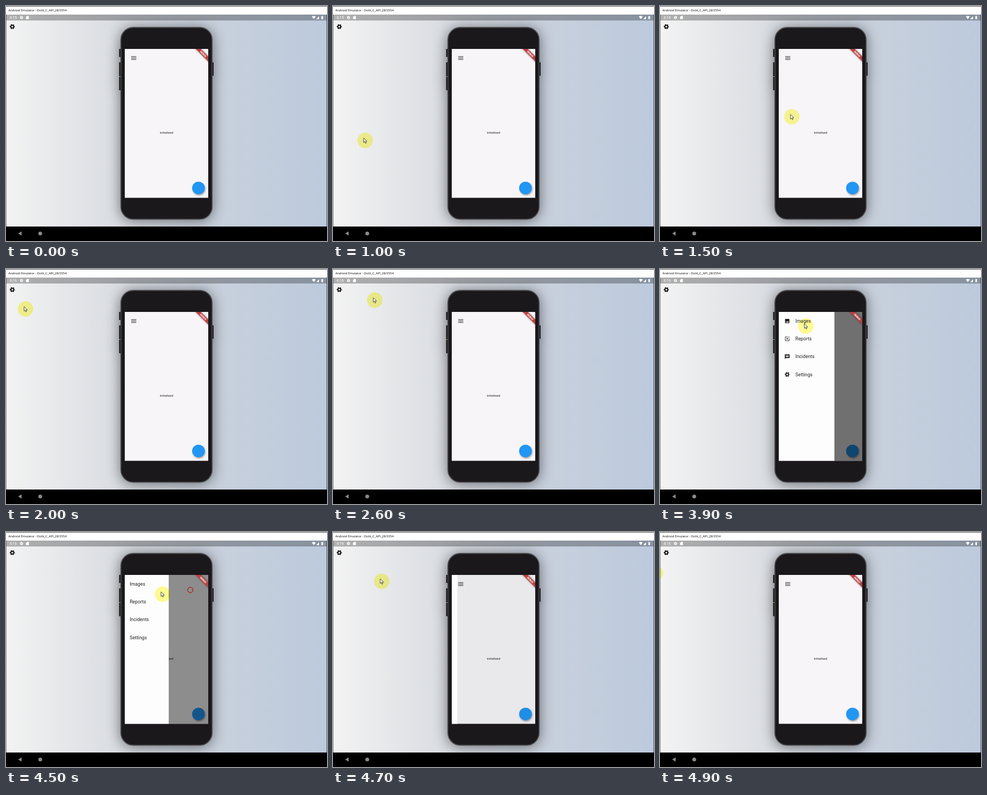
Write an HTML page that moves like this. It is 600 px wide and 438 px high and loops after 5 s.

```html
<!DOCTYPE html>
<html lang="en">
<head>
<meta charset="utf-8">
<title>Drawer demo</title>
<style>
  html, body { margin: 0; width: 100%; height: 100%; overflow: hidden; background: #000; }
  svg { display: block; }
  text { font-family: Roboto, sans-serif; }
  .title { font: 5.9px "Open Sans", sans-serif; }
  .item { font-size: 8.8px; fill: #222; }
  #phone { filter: drop-shadow(0 2px 12px rgba(0, 0, 0, .5)); }
  #fab { filter: drop-shadow(1.5px 2px 1.5px rgba(0, 0, 0, .35)); }
  #banner rect { filter: drop-shadow(0 0 1.5px rgba(0, 0, 0, .5)); }
  #halo { mix-blend-mode: multiply; }
</style>
</head>
<body>
<svg width="600" height="438" viewBox="0 0 600 438">
  <defs>
    <linearGradient id="sky">
      <stop offset="0" stop-color="#f3f3f3"/>
      <stop offset=".35" stop-color="#d9dce1"/>
      <stop offset=".65" stop-color="#c8d0dc"/>
      <stop offset="1" stop-color="#bccadd"/>
    </linearGradient>
    <!-- icons are centred on the origin, 24 units wide -->
    <g id="gear" fill="none" stroke="currentColor">
      <circle r="5.4" stroke-width="4"/>
      <circle r="8.2" stroke-width="3.6" pathLength="12" stroke-dasharray="1.1 .9" stroke-dashoffset=".55"/>
    </g>
    <path id="image" fill-rule="evenodd" d="M9 7V-7a2 2 0 0 0-2-2H-7a2 2 0 0 0-2 2V7a2 2 0 0 0 2 2H7a2 2 0 0 0 2-2zM-3.5 1.5l2.5 3L2.500 0 7 6H-7z"/>
    <g id="report">
      <path d="M2-8H-8V8H8V-2" fill="none" stroke="currentColor" stroke-width="2"/>
      <path d="M0-5l1.400 3.600L5 0 1.400 1.400 0 5-1.400 1.400-5 0-1.400-1.400zM7-10l1 2 2 1-2 1-1 2-1-2-2-1 2-1z"/>
    </g>
    <path id="message" fill-rule="evenodd" d="M8-10H-8a2 2 0 0 0-2 2V10l4-4H8a2 2 0 0 0 2-2V-8a2 2 0 0 0-2-2zM6 2H-6V0H6zM6-1H-6v-2H6zM6-4H-6v-2H6z"/>
  </defs>

  <rect width="600" height="411" fill="url(#sky)"/>

  <g id="phone">
    <path d="M211.500 80h3v15h-3zM211.500 105h3v26h-3zM211.500 132h3v25h-3zM385 105h3v25h-3z" fill="#161517"/>
    <rect x="214.800" y="40" width="170.400" height="357.300" rx="23" fill="#1a181b" stroke="#4b4b4e" stroke-width="1.800"/>
  </g>

  <svg x="222" y="80" width="156" height="277.500" viewBox="222 80 156 277.500">
    <rect x="222" y="80" width="156" height="278" fill="#f7f5f8"/>
    <path d="M234 94.200h9.600M234 97h9.600M234 99.800h9.600" stroke="#222" stroke-width="1.100"/>
    <text x="300" y="237.800" font-size="5.900" text-anchor="middle" fill="#222">initialised</text>
    <circle id="fab" cx="359.800" cy="339.200" r="11.800" fill="#2196f3"/>
    <rect id="scrim" x="222" y="80" width="156" height="278"/>
    <g id="drawer">
      <rect x="222" y="80" width="104" height="278" fill="#fefdfe"/>
    </g>
    <g id="banner" transform="translate(378 80) rotate(45)">
      <rect x="-25" y="9.900" width="50" height="6.600" fill="#bd3f3f"/>
      <text y="14.900" font-size="4.700" font-weight="900" text-anchor="middle" fill="#fff">DEBUG</text>
    </g>
  </svg>

  <use href="#gear" transform="translate(11.800 38.500) scale(.48)" color="#111"/>

  <rect y="16" width="600" height="11" fill="#000" opacity=".28"/>
  <g fill="#fff" color="#fff">
    <text id="clock" x="7" y="24" font-size="6.800"></text>
    <use href="#gear" transform="translate(29 21.500) scale(.32)"/>
    <path d="M39.500 18.500h3.200v6h-5.200v-4z"/>
    <path d="M571.800 19.800q3.500-2.400 7 0l-3.500 4.700zM580 24.500h5v-5.200zM589.500 19.200h.8v-.9h1.400v.9h.8v5.300h-3z"/>
  </g>

  <rect width="600" height="16" fill="#fff"/>
  <text class="title" x="4.500" y="10.300">Android Emulator - Dolit_C_API_28:5554</text>
  <path d="M0 .5H600" stroke="#555"/>
  <path d="M.25 16V411M599.500 16V411" stroke="#333" stroke-width=".7"/>
  <rect y="411" width="600" height="27"/>
  <path d="M22.800 424l6.400-3.900v7.800z" fill="#8a8a8a"/>
  <circle cx="64" cy="424" r="3.600" fill="#8a8a8a"/>

  <circle id="ring" fill="none" stroke="#a8322f" stroke-width="1.600"/>
  <circle id="halo" r="14.400" fill="#fefc93"/>
  <path id="arrow" d="M0 0V8.600l2-1.900 1.400 3.200 1.500-.7-1.400-3h2.700z" fill="#fff" stroke="#222" stroke-width=".8"/>
</svg>

<script>
const $ = id => document.getElementById(id);
const LOOP = 5000, STEP = 100, DRAWER_WIDTH = 104;

// [time, x, y]
const pointer = [
  [1000, 60, 250.5], [1500, 246.5, 206.5], [2000, 36.5, 74.5], [2100, 33.5, 69.5],
  [2300, 18, 48], [2500, 16.5, 46.5], [2700, 139.5, 69.5], [3000, 235, 100],
  [3100, 237.5, 101], [3300, 240.5, 103.5], [3600, 241, 103], [3900, 272.5, 106.5],
  [4100, 345, 108], [4400, 344.5, 108], [4500, 292.5, 116], [4800, 20.5, 83.5], [4900, -8.5, 76.7]
];
// [time, openness]
const opening = [
  [3500, 0], [3800, .98], [3900, 1], [4400, 1],
  [4500, .79], [4600, .36], [4700, .1], [4800, .02], [4900, 0]
];
// [time, x, y]
const clicks = [[3400, 240, 103], [4400, 344.5, 108]];

["Images", "Reports", "Incidents", "Settings"].forEach((label, i) => {
  const icon = ["image", "report", "message", "gear"][i], y = 97 + i * 33.2;
  $("drawer").innerHTML +=
    `<use href="#${icon}" transform="translate(237.8 ${y}) scale(.45)" fill="#222" color="#222"/>` +
    `<text class="item" x="253" y="${y + 3}">${label}</text>`;
});

function sample(keys, t) {
  const i = keys.findIndex(k => k[0] > t);
  if (i === 0) return keys[0].slice(1);
  if (i < 0) return keys.at(-1).slice(1);
  const [a, b] = [keys[i - 1], keys[i]];
  const p = (t - a[0]) / (b[0] - a[0]), e = p * p * (3 - 2 * p);
  return a.slice(1).map((v, j) => v + (b[j + 1] - v) * e);
}

function draw(t) {
  $("clock").textContent = t < 1200 ? "6:15" : "6:16";

  const [open] = sample(opening, t);
  $("scrim").setAttribute("opacity", .54 * open);
  $("drawer").setAttribute("transform", `translate(${DRAWER_WIDTH * (open - 1)} 0)`);

  const [x, y] = sample(pointer, t);
  const visible = t >= pointer[0][0] ? "visible" : "hidden";
  $("halo").setAttribute("transform", `translate(${x} ${y})`);
  $("arrow").setAttribute("transform", `translate(${x - 2.7} ${y - 4.5})`);
  $("halo").style.visibility = $("arrow").style.visibility = visible;

  const click = clicks.find(c => t >= c[0] && t < c[0] + 2 * STEP);
  $("ring").style.visibility = click ? "visible" : "hidden";
  if (click) {
    $("ring").setAttribute("transform", `translate(${click[1]} ${click[2]})`);
    $("ring").setAttribute("r", 2.5 + 2.5 * (t - click[0]) / STEP);
  }
}

function tick() {
  draw(Math.floor(performance.now() % LOOP / STEP) * STEP);
  requestAnimationFrame(tick);
}
tick();
</script>
</body>
</html>
```
